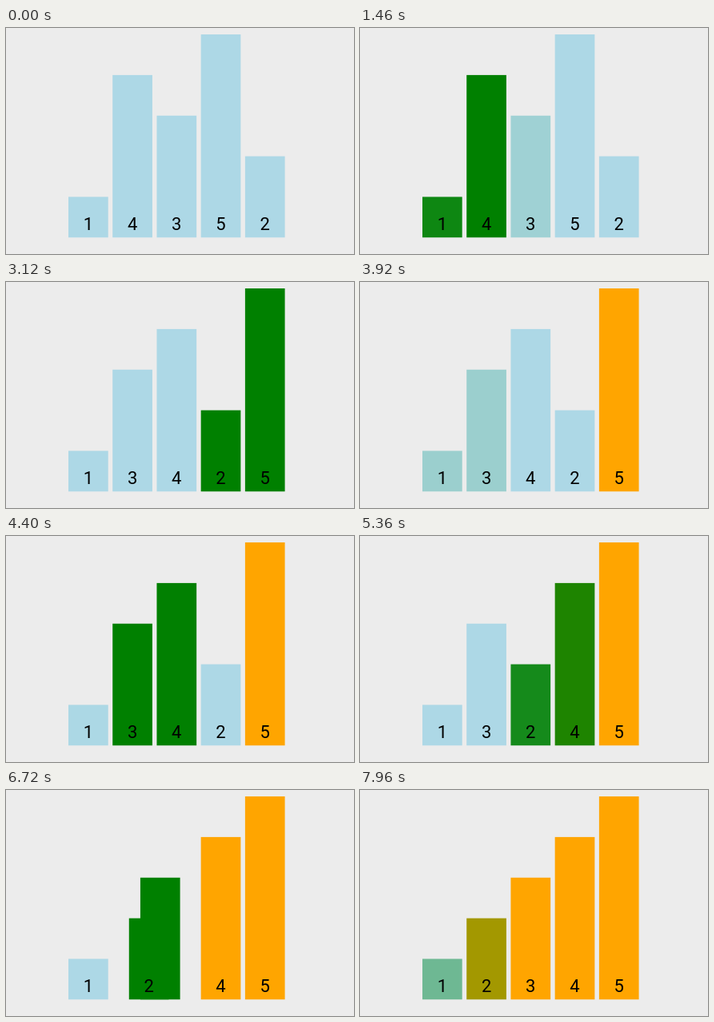
Animation of 435 by 283 pixels, one loop 8 s. Source, as an HTML page with a canvas:

```html
<!DOCTYPE html>
<html lang="en">
<head>
<meta charset="utf-8">
<title>Bubble sort</title>
<style>
html, body { margin: 0; width: 100%; height: 100%; overflow: hidden; background: #ececec; }
canvas { display: block; }
</style>
</head>
<body>
<canvas id="stage" width="435" height="283"></canvas>
<script>
const ctx = document.getElementById('stage').getContext('2d');
const LOOP = 8000, FADE = 200, SLIDE = 250;
const LEFT = 78, PITCH = 55.22, WIDTH = 49.7, BASE = 262.3, UNIT = 50.85;
const BLUE = [173, 216, 230], GREEN = [0, 128, 0], ORANGE = [255, 165, 0];
const VALUES = [1, 4, 3, 5, 2];

// [start ms, action, slot]
const STEPS = [
  [1110, 'compare', 0], [1443, 'compare', 1], [1825, 'swap', 1],
  [2222, 'compare', 2], [2542, 'compare', 3], [2850, 'swap', 3], [3205, 'settle', 4],
  [3900, 'compare', 0], [4220, 'compare', 1], [4632, 'compare', 2],
  [4943, 'swap', 2], [5338, 'settle', 3],
  [5992, 'compare', 0], [6318, 'compare', 1], [6630, 'swap', 1], [7018, 'settle', 2],
  [7588, 'compare', 0], [7887, 'settle', 1]
];

const mix = (a, b, p) => a + (b - a) * p;

// cubic-bezier(.25, .1, .25, 1)
function ease(x) {
  if (x <= 0) return 0;
  if (x >= 1) return 1;
  const bezier = (a, b, u) => 3 * a * u * (1 - u) ** 2 + 3 * b * u * u * (1 - u) + u ** 3;
  let lo = 0, hi = 1;
  for (let i = 0; i < 24; i++) {
    const mid = (lo + hi) / 2;
    if (bezier(0.25, 0.25, mid) < x) lo = mid; else hi = mid;
  }
  return bezier(0.1, 1, lo);
}

// Replays every step up to time t.
function barsAt(t) {
  const bars = VALUES.map((value, slot) => ({ value, pos: slot, color: BLUE }));
  const order = bars.slice();
  let sorted = bars.length;
  for (const [start, action, slot] of STEPS) {
    if (t < start) break;
    if (action === 'swap') {
      const p = ease((t - start) / SLIDE);
      const a = order[slot], b = order[slot + 1];
      a.pos = slot + p;
      b.pos = slot + 1 - p;
      order[slot] = b;
      order[slot + 1] = a;
      continue;
    }
    if (action === 'settle') sorted = slot;
    const p = ease((t - start) / FADE);
    order.forEach((bar, i) => {
      const active = action === 'compare' && (i === slot || i === slot + 1);
      const goal = i >= sorted ? ORANGE : active ? GREEN : BLUE;
      bar.color = bar.color.map((c, k) => mix(c, goal[k], p));
    });
  }
  return bars;
}

function draw(t) {
  ctx.fillStyle = '#ececec';
  ctx.fillRect(0, 0, 435, 283);
  ctx.font = '22px Roboto, sans-serif';
  ctx.textAlign = 'center';
  for (const { value, pos, color } of barsAt(t)) {
    const x = LEFT + pos * PITCH, height = value * UNIT;
    ctx.fillStyle = `rgb(${color.map(Math.round).join(',')})`;
    ctx.fillRect(x, BASE - height, WIDTH, height);
    ctx.fillStyle = '#000';
    ctx.fillText(value, x + WIDTH / 2, 253);
  }
}

const origin = performance.now();
function tick() {
  draw((performance.now() - origin) % LOOP);
  requestAnimationFrame(tick);
}
tick();
</script>
</body>
</html>
```
